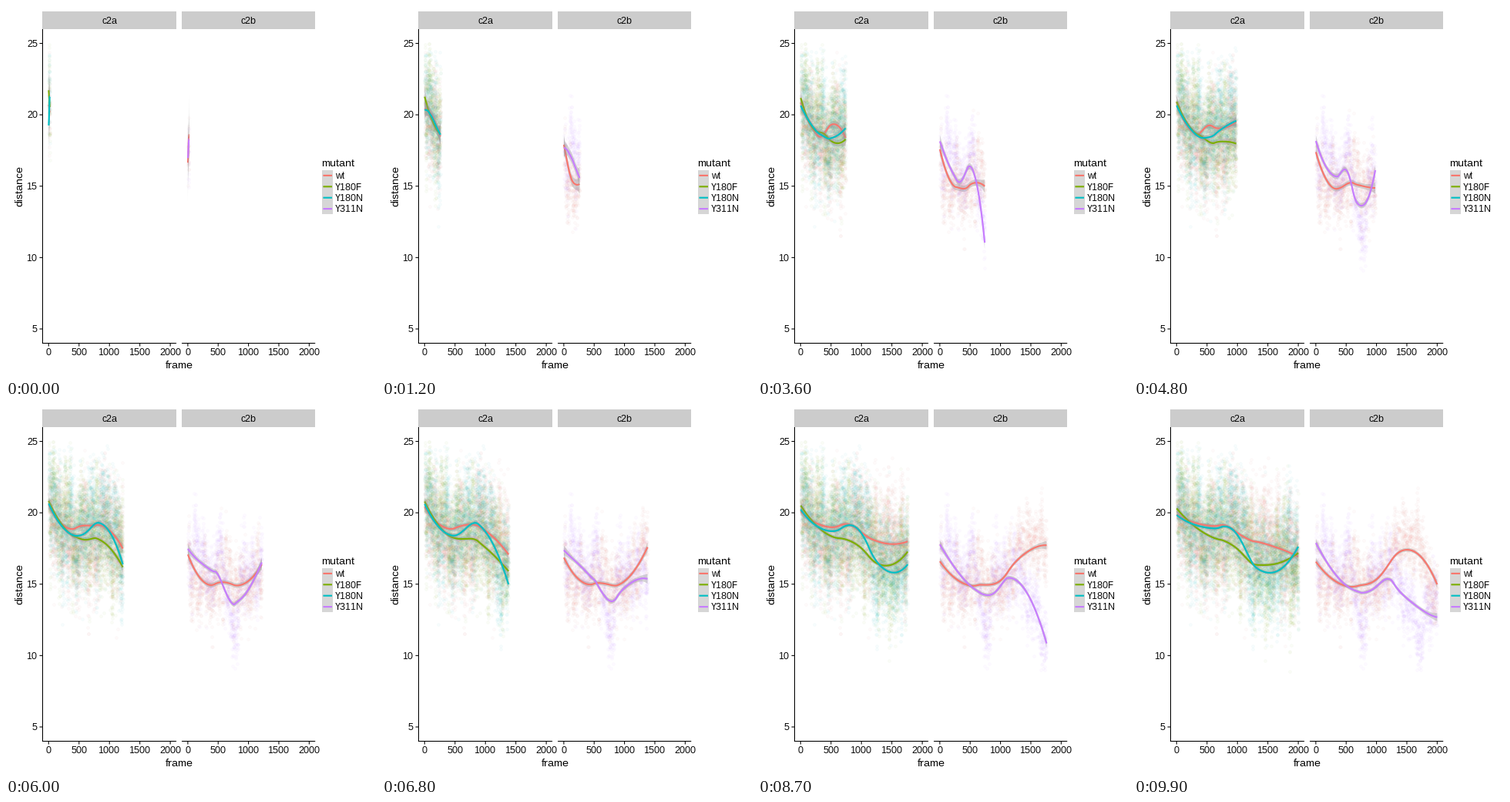
Animation of 480x480 px, one loop 10 s. Source, as a matplotlib script:

```python
import numpy as np
import matplotlib.pyplot as plt
from matplotlib.animation import FuncAnimation

plt.rcParams.update({"font.family": "Liberation Sans",
                     "text.hinting": "native", "text.hinting_factor": 1})

SIZE = 480
PX = 0.72                # points per pixel at 100 dpi
STEPS, STRIDE = 100, 20  # animation steps, samples revealed per step
TOTAL = STEPS * STRIDE
SPAN = 0.75              # share of the data in each local fit
TOP, BOTTOM = 30, 437.5
PANELS = {"c2a": (47.4, 221), "c2b": (228, 401.2)}
COLORS = {"wt": "#F8766D", "Y180F": "#7CAE00", "Y180N": "#00BFC4", "Y311N": "#C77CFF"}

# panel: points per sample, slow drift sd, scatter sd
SPREAD = {"c2a": (2, 1.5, 1.7), "c2b": (1, 1.1, 1.1)}

# panel, mutant, size of the opening swing, key levels evenly spaced over the run
GROUPS = [
    ("c2a", "wt", -0.3, [20.4, 19.9, 18.6, 18.5, 19.5, 19.2, 18.5, 19.6, 19.0,
                         18.0, 17.4, 17.8, 18.2, 17.9, 17.7, 17.2, 16.2]),
    ("c2a", "Y180F", -0.5, [21.2, 19.6, 18.7, 18.9, 18.0, 18.0, 18.3, 18.3, 17.4,
                            16.8, 16.4, 16.3, 15.6, 16.7, 17.7, 16.9, 15.9]),
    ("c2a", "Y180N", 1.2, [20.5, 19.8, 18.7, 18.7, 18.1, 18.9, 18.8, 19.8, 18.7,
                           17.4, 16.4, 15.6, 14.6, 16.0, 17.3, 17.0, 16.3]),
    ("c2b", "wt", 1.4, [18.1, 15.5, 15.1, 14.8, 15.0, 15.6, 14.6, 14.9, 15.2,
                        15.8, 16.6, 17.4, 18.2, 17.6, 17.0, 16.0, 14.4]),
    ("c2b", "Y311N", 0.8, [17.8, 17.0, 15.7, 15.1, 16.9, 14.9, 11.4, 15.6, 15.0,
                           15.7, 15.4, 14.8, 13.7, 12.6, 11.4, 13.6, 13.9]),
]

rng = np.random.default_rng(7)


def level(x, keys, swing):
    """Mean distance at x: a smooth curve through the keys plus an opening swing."""
    v = np.array(keys)
    slope = np.gradient(v, edge_order=2)
    t = x / TOTAL * (len(v) - 1)
    i = np.minimum(t.astype(int), len(v) - 2)
    t = t - i
    curve = ((1 + 2 * t) * (1 - t) ** 2 * v[i] + t * (1 - t) ** 2 * slope[i]
             + t * t * (3 - 2 * t) * v[i + 1] + t * t * (t - 1) * slope[i + 1])
    return curve - swing * np.exp(-x / 60) * np.cos(np.pi * x / 20)


def loess_matrix(at, design):
    """Rows that turn values on the design into local quadratic fits."""
    rows = []
    for u in at:
        d = design - u
        reach = max(SPAN / 2, SPAN - min(u, 1 - u))
        w = np.clip(1 - np.abs(d / reach) ** 3, 0, None) ** 3
        basis = np.vander(d, 3, increasing=True)
        weighted = basis.T * w
        rows.append(np.linalg.solve(weighted @ basis, weighted)[0])
    return np.array(rows)


def samples(keys, swing, reps, drift, scatter):
    x = np.repeat(np.arange(1, TOTAL + 1), reps)
    knots = np.arange(0, TOTAL + 26, 25)
    y = level(x, keys, swing)
    y += np.interp(x, knots, rng.normal(0, drift, len(knots)))
    y += rng.normal(0, scatter, len(x))
    return x, np.where((y > 5) & (y <= 25), y, np.nan)


U = np.linspace(0, 1, 81)
DESIGN = np.linspace(0, 1, 201)
LOESS = loess_matrix(U, DESIGN)

fig = plt.figure(figsize=(4.8, 4.8), dpi=100, facecolor="white")


def add_axes(x0, x1, y0, y1):
    ax = fig.add_axes([x0 / SIZE, 1 - y1 / SIZE, (x1 - x0) / SIZE, (y1 - y0) / SIZE])
    ax.axis("off")
    return ax


page = add_axes(0, SIZE, 0, SIZE)
page.set(xlim=(0, SIZE), ylim=(SIZE, 0))


def label(x, y, s, size=12, ha="center", **kw):
    page.text(x, y, s, fontsize=size * PX, ha=ha, va="baseline", **kw)


def stroke(xs, ys, color="black", width=1.07):
    page.plot(xs, ys, color=color, lw=width * PX, solid_capstyle="butt", snap=False)


def box(x0, x1, y0, y1, color):
    page.fill([x0, x1, x1, x0], [y0, y0, y1, y1], color=color, lw=0)


axes = {}
for name, (left, right) in PANELS.items():
    box(left, right, 7, TOP, "#CCCCCC")
    label((left + right) / 2, 23, name)
    stroke([left, right], [BOTTOM, BOTTOM])
    for v in range(0, 2001, 500):
        x = left + (right - left) * (v + 100) / 2200
        stroke([x, x], [BOTTOM, BOTTOM + 4])
        label(x, 453, str(v))
    axes[name] = add_axes(left, right, TOP, BOTTOM)
    axes[name].set(xlim=(-100, 2100), ylim=(4, 26))

stroke([47.5, 47.5], [TOP, BOTTOM + 0.5])
for v in range(5, 26, 5):
    y = TOP + (26 - v) / 22 * (BOTTOM - TOP)
    stroke([43.5, 47.5], [y, y])
    label(41, y + 4.3, str(v), ha="right")
label(224.5, 470, "frame", 14)
label(21, 233.7, "distance", 14, rotation=90, rotation_mode="anchor")

label(409.5, 208, "mutant", 14, "left")
box(410, 424.4, 212.7, 270.3, "#D6D6D6")
for k, (name, color) in enumerate(COLORS.items()):
    y = 219.9 + 14.4 * k
    stroke([411.4, 423], [y, y], color, 2.13)
    label(427, y + 4.3, name, ha="left")

series = []
for k, (panel, mutant, swing, keys) in enumerate(GROUPS):
    ax, color = axes[panel], COLORS[mutant]
    x, y = samples(keys, swing, *SPREAD[panel])
    dots, = ax.plot([], [], "o", color=color, alpha=0.03, ms=3.9 * PX, mew=0.7 * PX, zorder=1)
    band, = ax.fill([0, 0, 0], [5, 5, 5], color="#999999", alpha=0.4, lw=0, zorder=2 + k)
    line, = ax.plot([], [], color=color, lw=2.13 * PX, solid_capstyle="butt", zorder=2.5 + k)
    series.append((x, y, keys, swing, dots, band, line))


def update(step):
    n = STRIDE * (step + 1)
    fx = 1 + U * (n - 1)
    half = 0.13 * np.sqrt(TOTAL / n) * (1 + 1.2 * np.abs(2 * U - 1) ** 8)
    for x, y, keys, swing, dots, band, line in series:
        fy = LOESS @ level(DESIGN * n, keys, swing)
        shown = n * len(x) // TOTAL
        dots.set_data(x[:shown], y[:shown])
        line.set_data(fx, fy)
        band.set_xy(np.column_stack([np.r_[fx, fx[::-1]],
                                     np.r_[fy - half, (fy + half)[::-1]]]))
    return []


anim = FuncAnimation(fig, update, frames=STEPS, interval=100, repeat=True, repeat_delay=0)
plt.show()
```
